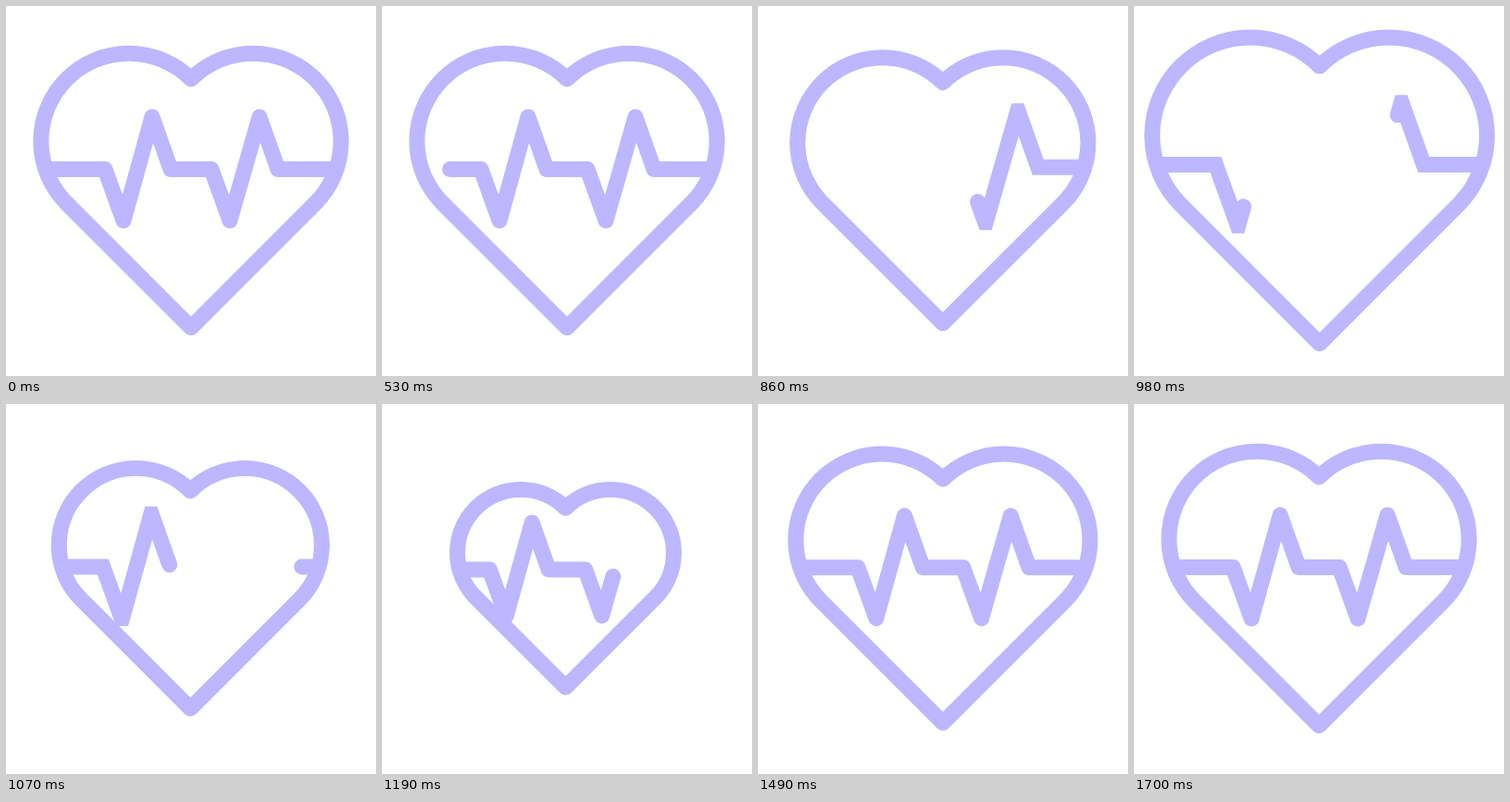
Recreate the animation shown at these times as an HTML page with a canvas. Size 400 by 400 pixels, loop 1.73 s.

```html
<!DOCTYPE html>
<html lang="en">
<head>
<meta charset="utf-8">
<title>Heartbeat</title>
<style>
  html, body { margin: 0; width: 100%; height: 100%; overflow: hidden; background: #fff; }
  canvas { display: block; width: 400px; height: 400px; }
</style>
</head>
<body>
<canvas id="stage"></canvas>
<script>
const LOOP = 1730, REST = 530, STEP = 30;
const COLOR = '#beb6ff', WIDTH = 17;
const WAVE = [[37.5, 176.5], [107, 176.5], [127, 232], [158, 120], [178, 176.5],
              [222, 176.5], [242, 232], [274, 120], [294, 176.5], [362.5, 176.5]];

const canvas = document.getElementById('stage');
const ctx = canvas.getContext('2d');
const dpr = window.devicePixelRatio || 1;
canvas.width = canvas.height = 400 * dpr;

const clamp = v => Math.min(1, Math.max(0, v));
const span = (t, from, to) => clamp((t - from) / (to - from));
const smooth = t => t * t * (3 - 2 * t);

// Cubic bezier easing with handles (x1, 0) and (x2, 1).
function settle(x, x1, x2) {
  let lo = 0, hi = 1;
  for (let i = 0; i < 24; i++) {
    const u = (lo + hi) / 2, v = 1 - u;
    if (3 * u * v * v * x1 + 3 * u * u * v * x2 + u * u * u < x) lo = u;
    else hi = u;
  }
  return smooth(lo);
}

// Shrink, swell, shrink again, then settle back to full size.
function beat(t, small, big, tail) {
  const mix = (a, b, k) => a + (b - a) * k;
  if (t < 740) return mix(1, small, smooth(span(t, 530, 740)));
  if (t < 950) return mix(small, big, smooth(span(t, 740, 950)));
  if (t < 1160) return mix(big, small, smooth(span(t, 950, 1160)));
  return mix(small, 1, settle(span(t, 1160, 1700), 0.167, tail));
}

function heartPath(s) {
  const x = v => 194.5 + (v - 194.5) * s;
  const y = v => 199 + (v - 199) * s;
  const r = 95, d = r * Math.SQRT1_2, cy = 146.2;
  const path = new Path2D();
  path.moveTo(x(200), y(cy + 3 * d));
  path.arc(x(200 - d), y(cy), r * s, Math.PI * 0.75, Math.PI * 1.75);
  path.arc(x(200 + d), y(cy), r * s, Math.PI * 1.25, Math.PI * 0.25);
  path.closePath();
  return path;
}

function drawWave(s, from, to) {
  if (to - from < 0.001) return;
  const pts = WAVE.map(([x, y]) => [199 + (x - 199) * s, 201 + (y - 201) * s]);
  let length = 0;
  ctx.beginPath();
  pts.forEach(([x, y], i) => {
    ctx.lineTo(x, y);
    if (i) length += Math.hypot(x - pts[i - 1][0], y - pts[i - 1][1]);
  });
  if (to - from < 1) {
    ctx.setLineDash([(to - from) * length, length * 2]);
    ctx.lineDashOffset = -from * length;
  }
  ctx.stroke();
  ctx.setLineDash([]);
}

function draw(t) {
  ctx.setTransform(dpr, 0, 0, dpr, 0, 0);
  ctx.fillStyle = '#fff';
  ctx.fillRect(0, 0, 400, 400);
  ctx.strokeStyle = COLOR;
  ctx.lineWidth = WIDTH;
  ctx.lineCap = ctx.lineJoin = 'round';

  const heart = heartPath(beat(t, 0.705, 1.14, 0));
  const s = beat(t, 0.895, 1.22, 0.2);

  ctx.save();
  ctx.clip(heart);
  if (s > 1) {
    // The swollen wave has sharp corners with flattened tips.
    const top = 201 - 81 * s - 7.4, bottom = 201 + 31 * s + 7.4;
    ctx.beginPath();
    ctx.rect(0, top, 400, bottom - top);
    ctx.clip();
    ctx.lineJoin = 'miter';
  }
  if (t < REST) {
    drawWave(s, 0, 1);
  } else {
    drawWave(s, span(t, 496, 1113), 1);
    drawWave(s, 0, 1 - Math.pow(1 - span(t, 910, 1700), 2.75));
  }
  ctx.restore();
  ctx.stroke(heart);
}

const start = performance.now();
function tick() {
  const t = (performance.now() - start) % LOOP;
  draw(t < REST ? 0 : REST + Math.floor((t - REST) / STEP) * STEP);
  requestAnimationFrame(tick);
}
tick();
</script>
</body>
</html>
```
